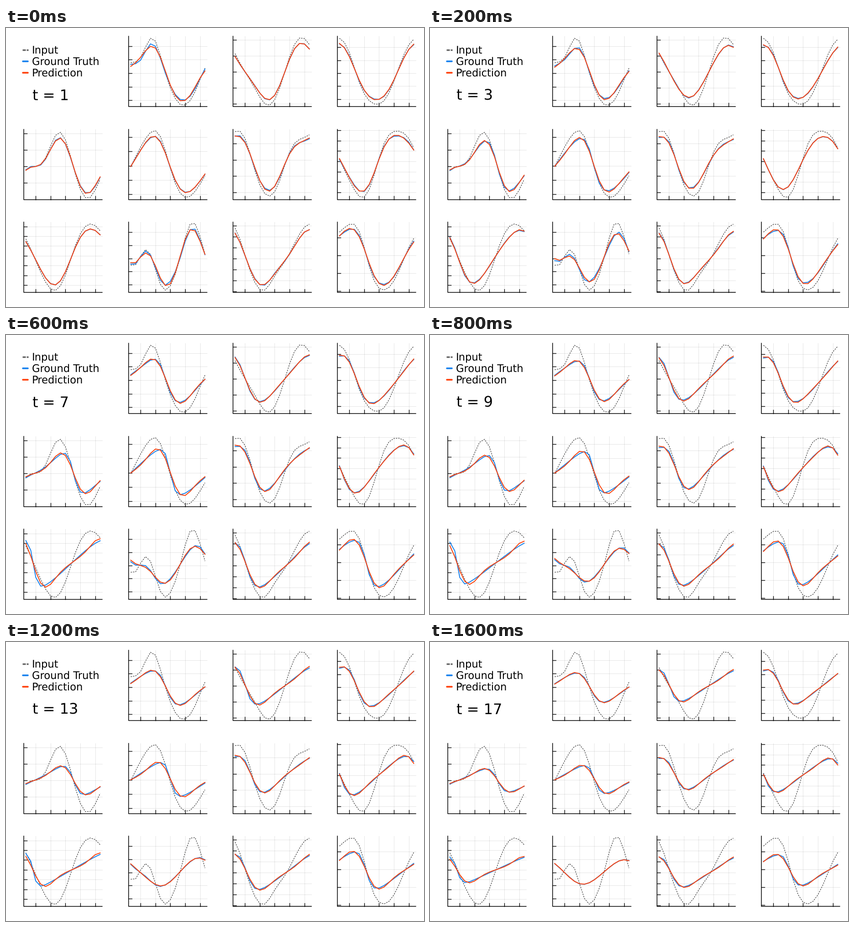
Recreate the animation shown at these times as a matplotlib script. Size 917 by 611 pixels, loop 2 s.

```python
import matplotlib.pyplot as plt
import numpy as np
from matplotlib.animation import FuncAnimation

plt.rcParams["text.hinting"] = "none"

W, H, DPI = 917, 611, 100
PX = 72 / DPI  # one pixel in points
BLUE, ORANGE, GRAY = "#1580ee", "#ff400a", "#4d4d4d"
LEFT = [38.5, 268.5, 497.5, 726.5]
BOTTOM = [171.8, 375.6, 579.2]
PLOT_W, PLOT_H = 172.8, 154
POINTS, FINE = 16, 64  # drawn samples and solver grid per period
STEP = 163 / (POINTS - 1)
LAST = 17
GAIN = 0.84        # solution amplitude relative to the drawn input
SPEED = 0.105      # samples per time step for one velocity unit
VISCOSITY = 0.19   # in samples squared per time step
SUBSTEPS = 20

# Zero level, tick gap in pixels, velocity units per tick,
# and the start wave at every second sample as pixels above zero.
WAVES = [
    (99, 29.65, 1, [23, 34, 76.5, 39, -32, -68.5, -60, -14]),
    (96, 35, 2, [40, 0, -36, -70, -61, -2, 60, 73]),
    (99, 28.4, 1, [76.5, 45, -20, -60, -68, -43, 12, 62]),
    (303, 36.2, 2, [-9, 0, 19, 68, 58, -17, -68.5, -52]),
    (301.7, 31.25, 2, [-2, 41, 73, 64, -5, -60, -67, -40]),
    (288.7, 35.7, 1.4, [62, 47, -23, -74, -70, -13, 36, 49]),
    (292, 22.6, 1, [5, -41, -77, -62, 7, 58, 66, 50]),
    (498.7, 21.4, 2, [37, -11, -58, -76, -42, 22, 64, 66]),
    (504.6, 28.8, 1, [-15, 5, 9, -57, -60, 2, 75, 48]),
    (505.1, 23.9, 1, [67, 8, -52, -69, -38, -7, 33, 69]),
    (498, 38.9, 2, [51, 68, 52, -23, -72, -70, -34, 17]),
]
zero, gap, per_tick = (np.array(v, float)[:, None] for v in list(zip(*WAVES))[:3])


def smooth_wave(keys):
    """Band-limited periodic curve through evenly spaced keys."""
    spectrum = np.fft.rfft(keys)
    spectrum[:, -1] /= 2
    return np.fft.irfft(spectrum, FINE) * FINE / keys.shape[1]


modes = np.arange(FINE // 2 + 1)
wavenumber = 2 * np.pi * modes / POINTS
rate = SPEED * per_tick / gap


def burgers(spectrum):
    u = np.fft.irfft(spectrum, FINE)
    flux = np.fft.rfft(rate * u * u / 2)
    return -1j * wavenumber * flux - VISCOSITY * wavenumber**2 * spectrum


def advance(spectrum):
    """One time step of the viscous Burgers equation (Runge-Kutta)."""
    h = 1 / SUBSTEPS
    for _ in range(SUBSTEPS):
        a = burgers(spectrum)
        b = burgers(spectrum + h / 2 * a)
        c = burgers(spectrum + h / 2 * b)
        d = burgers(spectrum + h * c)
        spectrum = spectrum + h / 6 * (a + 2 * b + 2 * c + d)
    return spectrum


def heights(spectrum):
    return zero - np.fft.irfft(spectrum, FINE)[:, ::FINE // POINTS]


start = np.fft.rfft(smooth_wave(np.array([wave[3] for wave in WAVES], float)))
# The prediction only resolves the lowest waves.
low_pass = np.where(modes < 3, 1, np.where(modes == 3, 0.35, 0))
truth, prediction = [], []
state = GAIN * start
for _ in range(LAST):
    truth.append(heights(state))
    prediction.append(heights(state * low_pass))
    state = advance(state)

fig = plt.figure(figsize=(W / DPI, H / DPI), dpi=DPI, facecolor="white")
ax = fig.add_axes([0, 0, 1, 1])
ax.set(xlim=(0, W), ylim=(H, 0))
ax.axis("off")


def stroke(x, y, color, width, **kw):
    return ax.plot(x, y, color=color, lw=width * PX, solid_joinstyle="round", **kw)[0]


def label(x, y, text, size):
    return ax.text(x, y, text, fontsize=size * PX, family="DejaVu Sans", va="baseline")


def draw_axes(x0, y0, level, spacing):
    x1, y1 = x0 + PLOT_W, y0 - PLOT_H
    for i in range(2, POINTS, 3):
        x = x0 + 5 + STEP * i
        stroke([x, x], [y0, y1], "black", 1, alpha=0.1)
        stroke([x, x], [y0, y0 - 7.5], "black", 1.4)
    for k in range(-4, 5):
        y = level + k * spacing
        if y1 < y < y0 - 0.5:
            stroke([x0, x1], [y, y], "black", 1, alpha=0.1)
            stroke([x0, x0 + 7.5], [y, y], "black", 1.4)
    stroke([x0, x0, x1], [y1, y0, y0], "black", 1.5)


lines = []
for slot, curve in enumerate(heights(start), 1):  # the legend takes slot 0
    row, col = divmod(slot, 4)
    x0 = LEFT[col]
    draw_axes(x0, BOTTOM[row], *WAVES[slot - 1][:2])
    x = x0 + 5 + STEP * np.arange(POINTS)
    stroke(x, curve, GRAY, 1.4, dashes=(2.1, 1.6))
    lines.append([stroke(x, curve, c, 1.9) for c in (BLUE, ORANGE)])

for i, name in enumerate(["Input", "Ground Truth", "Prediction"]):
    label(56.8, 56.2 + 24.75 * i, name, 22.6)
for x0, x1 in [(35.5, 42.5), (45, 48.5)]:
    stroke([x0, x1], [48, 48], "#666666", 3.4, solid_capstyle="butt")
for y, color in [(72.8, BLUE), (97.5, ORANGE)]:
    stroke([37, 48], [y, y], color, 3.6, solid_capstyle="round")
clock = label(58, 157.5, "t = 1", 32)


def update(frame):
    t = min(frame + 1, LAST)
    clock.set_text(f"t = {t}")
    for (blue, orange), y_true, y_pred in zip(lines, truth[t - 1], prediction[t - 1]):
        blue.set_ydata(y_true)
        orange.set_ydata(y_pred)
    return []


anim = FuncAnimation(fig, update, frames=20, interval=100, repeat=True, repeat_delay=0)
plt.show()
```
